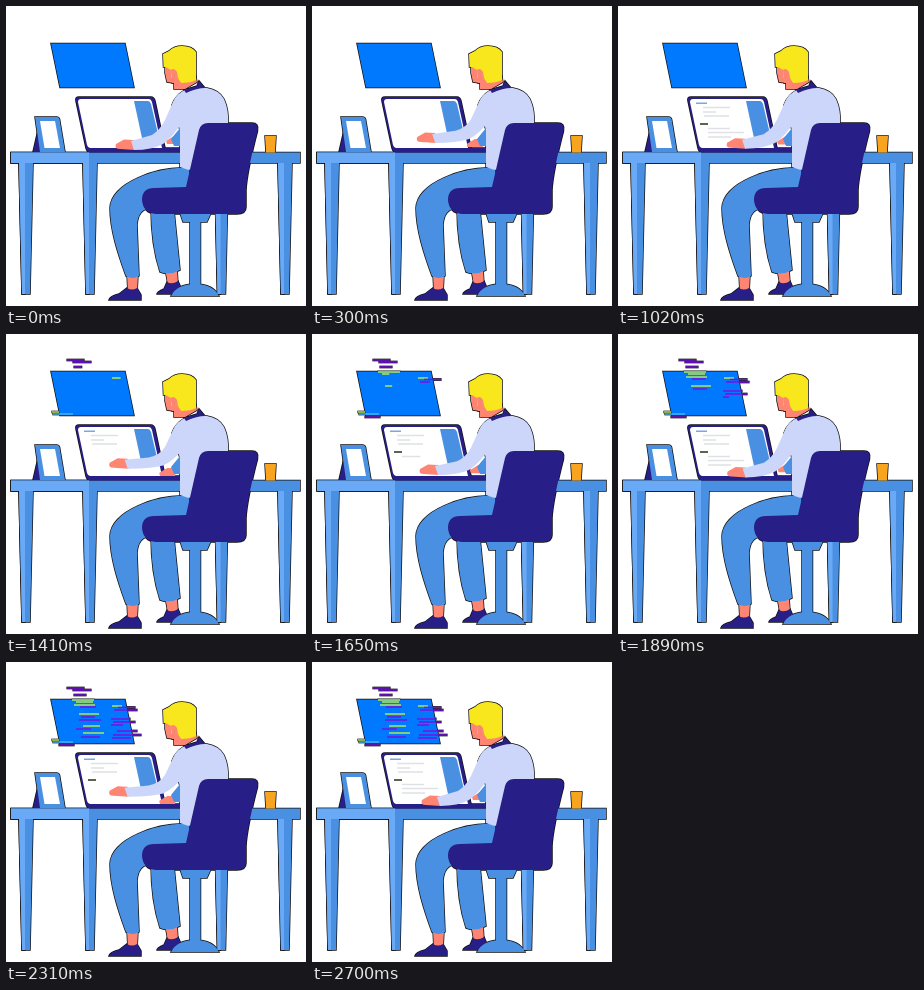
An HTML page with a canvas that plays this animation: 300 by 300 pixels, repeating every 2.73 s.

```html
<!DOCTYPE html>
<html lang="en">
<head>
<meta charset="utf-8">
<title>Coder at a desk</title>
<style>
html, body { margin: 0; width: 100%; height: 100%; overflow: hidden; background: #fff; }
canvas { display: block; width: 300px; height: 300px; }
</style>
</head>
<body>
<canvas id="stage" width="300" height="300"></canvas>
<script>
const ctx = document.getElementById('stage').getContext('2d');
const LOOP = 2730, STEP = 30, TYPING = LOOP / 3, PAGE = 780, PAGE_START = 390;
const NAVY = '#281e87', BLUE = '#4a90e2', SKY = '#69a9f6', SCREEN = '#0079ff',
  SHIRT = '#ccd6fa', SKIN = '#ff8573', HAIR = '#f8e71c', GREY = '#dfe1e4',
  PURPLE = '#7512df', LIME = '#b0e85c', CYAN = '#45b4f2';

const clamp = v => Math.max(0, Math.min(1, v));
const shape = (color, d) => ({ color, path: new Path2D(d) });

// Legs taper towards the floor and catch light on the left.
const tableLeg = x => [
  shape(BLUE, `M${x} 157h14L${x + 11} 288h-8z`),
  shape(SKY, `M${x} 157h6L${x + 6} 288h-3z`)
];

const screen = shape(SCREEN, 'M45 37.5L119 37.5L128 81.5L54 81.5Z');

const furniture = [
  ...[13, 77, 208.5, 272].flatMap(tableLeg),
  shape(BLUE, 'M5 146.5H294V157H5Z'),
  shape(SKY, 'M5 146.5H83V157H5Z'),
  shape(NAVY, 'M32 124L27 146H35Z'),
  shape(BLUE, 'M29 111H51Q53 111 53.5 113L59 146H34Z'),
  shape('#fff', 'M34 115H49L54 142H38.5Z'),
  shape('#f9a41f', 'M259 130H270L269 146.5H260Z')
];

const laptop = [
  shape(NAVY, 'M73 91H145Q148 91 149 95L159 142H174V146.5H84Q81 146 80 142L70 95Q69 91 73 91Z'),
  shape('#fff', 'M75 93H143Q145 93 146 96L156 142H84Q82 142 81 139L72 96Q72 93 75 93Z'),
  shape(BLUE, 'M128 95H142Q144 95 145 98L153 132H136Z')
];

const lowerBody = [
  shape(SKIN, 'M121 268H132L131 287H122ZM159 262H171L172 279H162Z'),
  shape(NAVY, 'M121 282Q126 285 131 282L135 289V294H103Q104 290 113 288ZM161 276Q166 279 172 275L175 282V288H151Q151 286 158 283Z'),
  shape(BLUE, 'M183 162C151 160 105 177 104 202C104 224 112 248 120 270Q127 274 133 270L131 219Q132 203 145 202C145 225 148 248 154 266Q164 270 174 264L168 204L185 184Z')
];

const torso = shape(SHIRT, 'M179 84Q190 80 201 82Q213 84 218 93Q223 104 222 118L194 165L181 163.5L174 161L174 124L166 99Q169 90 179 84Z');

const chair = [
  shape(BLUE, 'M184 214H194.5V280H184Z'),
  shape(BLUE, 'M174 207H205L201 216H177Z'),
  shape(BLUE, 'M165 290Q171 278 189 278Q207 278 213 290Z'),
  shape(NAVY, 'M202 117H246Q253 117 251.5 125Q241 166 240 184V201Q240 208 231 208H150Q137 207 136 194Q136 182 148 182L180 181L193 124Q195 117 202 117Z')
];

const head = [
  shape(SKIN, 'M159 58L159 67L161 76L168 77L168 83H179L191 76L187 57Z'),
  shape(HAIR, 'M157.5 61L157 48L163 45Q168 40 176 40Q186 40 190 46L190 74Q184 77 175 77Q171 74 171 70L165 72L165 64L160 61Z'),
  shape(SKIN, 'M165 64Q168 61 171 66L172 72L175 77H166Z'),
  shape(NAVY, 'M178 84L191 80L193 75L199 82Q191 82 180 87Z')
];

const scenery = [screen, ...furniture, ...laptop];
const person = [...lowerBody, torso, ...chair];

// [x, y, width, colour, start time]
const code = [
  [61, 26, 17, PURPLE, 1150], [67, 28, 18, PURPLE, 1230], [68, 33, 12, PURPLE, 1320],
  [66, 38, 22, LIME, 1500], [70, 40, 17, LIME, 1590], [68, 43, 21, LIME, 1680], [74, 45, 16, PURPLE, 1770],
  [106, 44, 10, LIME, 1290], [112, 45.5, 17, PURPLE, 1480], [108, 48, 23, PURPLE, 1590],
  [105, 57, 19, PURPLE, 1650], [107, 60, 22, PURPLE, 1740], [105, 63, 12, PURPLE, 1820],
  [46, 78, 7, LIME, 1180], [47, 80, 20, CYAN, 1260], [53, 83, 15, PURPLE, 1500],
  [73, 52, 20, LIME, 1600], [75, 55, 14, PURPLE, 1740], [73, 58, 22, PURPLE, 1930],
  [77, 64, 17, LIME, 1990], [70, 67, 15, PURPLE, 2050], [77, 71, 21, LIME, 2110], [75, 75, 19, PURPLE, 2170],
  [111, 69, 20, PURPLE, 1990], [107, 73, 28, PURPLE, 2090], [106, 76, 19, PURPLE, 2170]
];

// [x, y, width, colour, delay within the page]
const notes = [
  [85, 101.5, 27, GREY, 50], [85, 106, 13, GREY, 130], [86, 110, 25, GREY, 180],
  [82, 118, 8, '#243314', 290], [90, 122.5, 22, GREY, 430],
  [90, 126.5, 36, GREY, 490], [90, 131, 23, GREY, 550]
];

function fillShapes(items) {
  for (const item of items) {
    ctx.fillStyle = item.color;
    ctx.fill(item.path);
  }
}

// Stroked before any fill, so only the outer silhouette keeps a dark fringe.
function drawFringe(time) {
  ctx.strokeStyle = '#111';
  ctx.lineWidth = 1.5;
  for (const item of [...scenery, ...person, ...head]) ctx.stroke(item.path);
  drawLines(code, time, 140, 0.6, '#111');
}

function drawLines(lines, time, duration, border = 0, override) {
  for (const [x, y, width, color, start] of lines) {
    const grown = clamp((time - start) / duration);
    if (!grown) continue;
    ctx.fillStyle = override || color;
    ctx.fillRect(x - border, y - 0.75 - border, width * grown + 2 * border, 1.5 + 2 * border);
  }
}

function drawNotes(time) {
  if (time < PAGE_START) return;
  ctx.fillStyle = '#75a9e7';
  ctx.fillRect(78, 96.5, 11, 1.5);
  drawLines(notes, (time - PAGE_START) % PAGE, 60);
}

function fillPath(color, d) {
  ctx.fillStyle = color;
  ctx.fill(new Path2D(d));
}

function drawRightArm(lift) {
  ctx.save();
  ctx.translate(7 * (1 - lift), -4 * (1 - lift));
  fillPath(SKIN, 'M154 142L153 139L161 134L170 134L169 142Z');
  ctx.restore();
  fillPath(BLUE, 'M174 122V140H168L165 133Z');
}

function drawLeftArm(lift) {
  const x = -6.5 * lift, y = -9.5 * lift;
  const hand = `M${128 + x} ${134 + y}L${118 + x} ${133.5 + y}L${110 + x} ${138 + y}Q${108 + x} ${143 + y} ${114 + x} ${143 + y}L${129 + x} ${144 + y}Z`;
  const sleeve = `M179 84Q170 88 167 96L159 ${114 - lift}Q154 ${124 + y * 0.3} ${146 + x * 0.5} ${129 + y * 0.6}L${125 + x} ${135 + y}L${128 + x} ${144 + y}Q${146 + x * 0.3} ${144 + y} 157 ${138 + y * 0.7}Q167 ${131 + y * 0.4} 177 115L182 92Z`;
  fillPath(SKIN, hand);
  fillPath(SHIRT, sleeve);
}

function draw(time) {
  ctx.fillStyle = '#fff';
  ctx.fillRect(0, 0, 300, 300);
  drawFringe(time);
  fillShapes(scenery);
  drawLines(code, time, 140);
  drawNotes(time);

  const lift = (1 - Math.cos(2 * Math.PI * time / TYPING)) / 2;
  drawRightArm(lift);
  fillShapes(person);
  drawLeftArm(lift);
  fillShapes(head);
}

const begin = performance.now();
function tick(now) {
  const elapsed = Math.max(0, now - begin) % LOOP;
  draw(Math.floor(elapsed / STEP) * STEP);
  requestAnimationFrame(tick);
}
draw(0);
requestAnimationFrame(tick);
</script>
</body>
</html>
```
